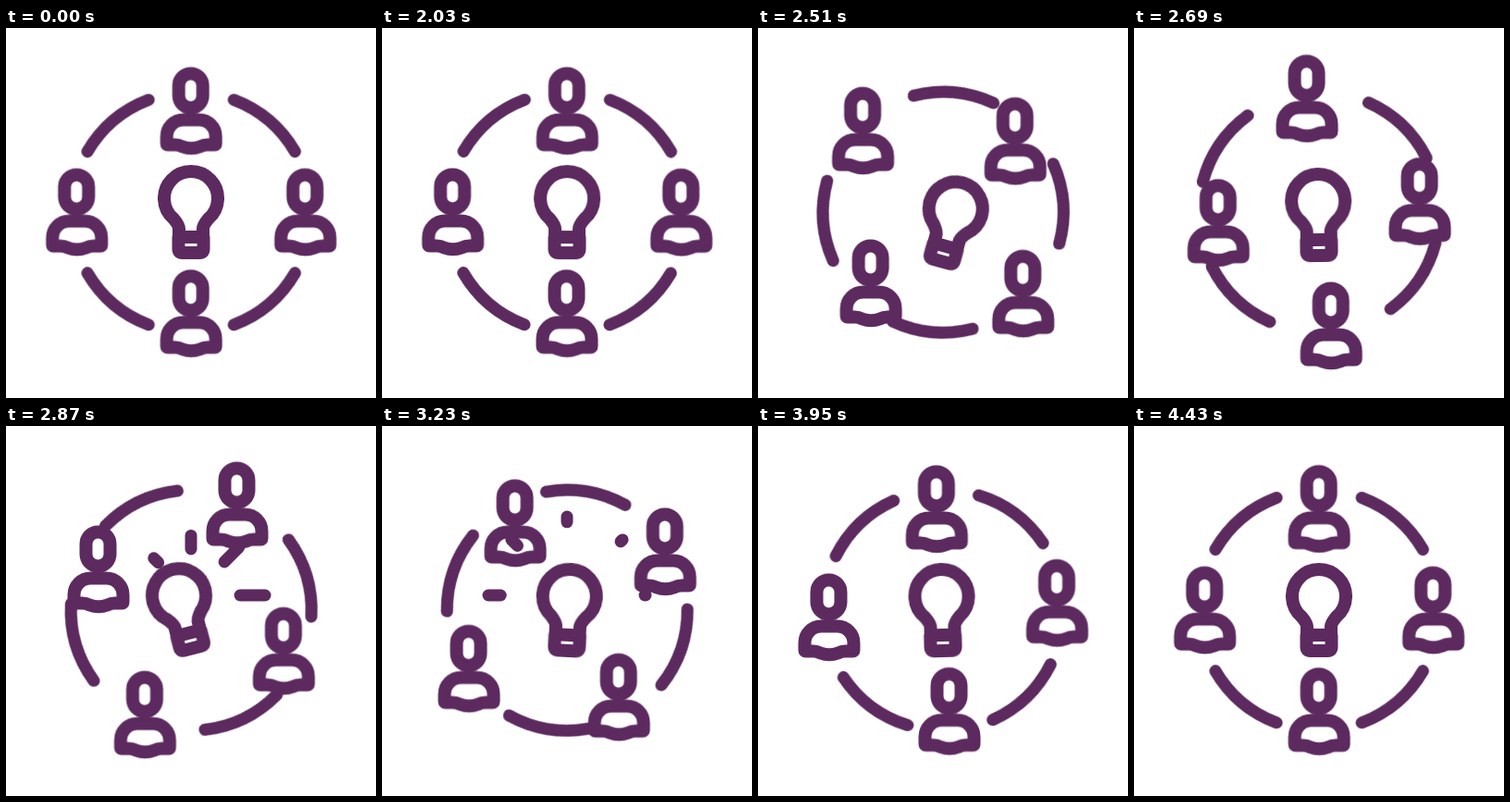
An HTML page for the animation above (4490 ms loop, 400 by 400 pixels).

```html
<!DOCTYPE html>
<html lang="en">
<head>
<meta charset="utf-8">
<title>Shared idea</title>
<style>
  @property --head { syntax: "<number>"; inherits: false; initial-value: 0; }
  @property --tail { syntax: "<number>"; inherits: false; initial-value: 0; }

  :root { --loop: 4490ms; }
  html, body { margin: 0; width: 100%; height: 100%; overflow: hidden; background: #fff; }
  svg {
    display: block; width: 100%; height: 100%;
    fill: none; stroke: #5c2a5f; stroke-width: 14;
    stroke-linecap: round; stroke-linejoin: round;
  }

  /* The ring turns while the people on it stay upright. */
  .spin { animation: spin var(--loop) infinite; }
  .upright { animation: unspin var(--loop) infinite; }
  @keyframes spin {
    0%, 44.543% { transform: rotate(0deg); animation-timing-function: cubic-bezier(.33, 0, .13, 1); }
    98.664%, 100% { transform: rotate(180deg); }
  }
  @keyframes unspin {
    0%, 44.543% { transform: rotate(0deg); animation-timing-function: cubic-bezier(.33, 0, .13, 1); }
    98.664%, 100% { transform: rotate(-180deg); }
  }

  .bulb { animation: wobble var(--loop) cubic-bezier(.333, 0, .667, 1) infinite; }
  @keyframes wobble {
    0%, 44.543% { transform: translateY(0) rotate(0deg); }
    55.68% { transform: translateY(9.5px) rotate(15.5deg); }
    63.7% { transform: translateY(-2.5px) rotate(-14.5deg); }
    73.27% { transform: translateY(0) rotate(4deg); }
    84.63% { transform: translateY(0) rotate(-2deg); }
    95.77%, 100% { transform: translateY(0) rotate(0deg); }
  }

  /* Each ray grows outwards, then its inner end catches up. */
  .rays path {
    stroke-width: 13;
    stroke-dasharray: calc((var(--head) - var(--tail)) * 35px) 100px;
    stroke-dashoffset: calc(var(--tail) * -35px);
    animation: head var(--loop) infinite, tail var(--loop) infinite, show var(--loop) step-end infinite;
    animation-delay: calc(var(--i) * 40ms);
    animation-fill-mode: backwards;
  }
  @keyframes head {
    0%, 59.688% { --head: 0; animation-timing-function: cubic-bezier(.333, 0, .667, 1); }
    65.256%, 100% { --head: 1; }
  }
  @keyframes tail {
    0%, 61.915% { --tail: 0; animation-timing-function: cubic-bezier(.333, 0, .667, 1); }
    73.051%, 100% { --tail: 1; }
  }
  @keyframes show {
    0% { visibility: hidden; }
    60.4% { visibility: visible; }
    72.9%, 100% { visibility: hidden; }
  }
</style>
</head>
<body>
<svg viewBox="0 0 400 400">
  <defs>
    <g id="person">
      <rect x="-13.5" y="-40.5" width="26" height="37" rx="13"/>
      <path d="M-26.500 35.500v-8a18 18 0 0 1 18-18h17a18 18 0 0 1 18 18v8q0 1-1 1h-8q-4 0-8 2-9.500 3.500-19 0-4-2-8-2h-8q-1 0-1-1z"/>
    </g>
    <path id="arc" d="M46-121.600A130 130 0 0 1 112.200-65.600" stroke-width="13"/>
  </defs>

  <g transform="translate(200.2 199.2)">
    <g class="spin">
      <use href="#arc"/>
      <use href="#arc" transform="scale(-1 1)"/>
      <use href="#arc" transform="scale(1 -1)"/>
      <use href="#arc" transform="scale(-1)"/>
      <g transform="translate(0 -109.5)"><use class="upright" href="#person"/></g>
      <g transform="translate(123.5 0)"><use class="upright" href="#person"/></g>
      <g transform="translate(0 109.5)"><use class="upright" href="#person"/></g>
      <g transform="translate(-123.5 0)"><use class="upright" href="#person"/></g>
    </g>
  </g>

  <g class="rays" transform="translate(200 183)">
    <path d="M50 0h35" style="--i:0"/>
    <path d="M50 0h35" style="--i:1" transform="rotate(-45)"/>
    <path d="M50 0h35" style="--i:2" transform="rotate(-90)"/>
    <path d="M50 0h35" style="--i:3" transform="rotate(-135)"/>
    <path d="M50 0h35" style="--i:4" transform="rotate(180)"/>
  </g>

  <g transform="translate(200 236)">
    <g class="bulb">
      <path d="M-13-10v-9q0-4-6-11a29 29 0 1 1 38 0q-6 7-6 11v9z"/>
      <path d="M-13.500-10v13q0 4 4 4h19q4 0 4-4v-13z"/>
    </g>
  </g>
</svg>
</body>
</html>
```
